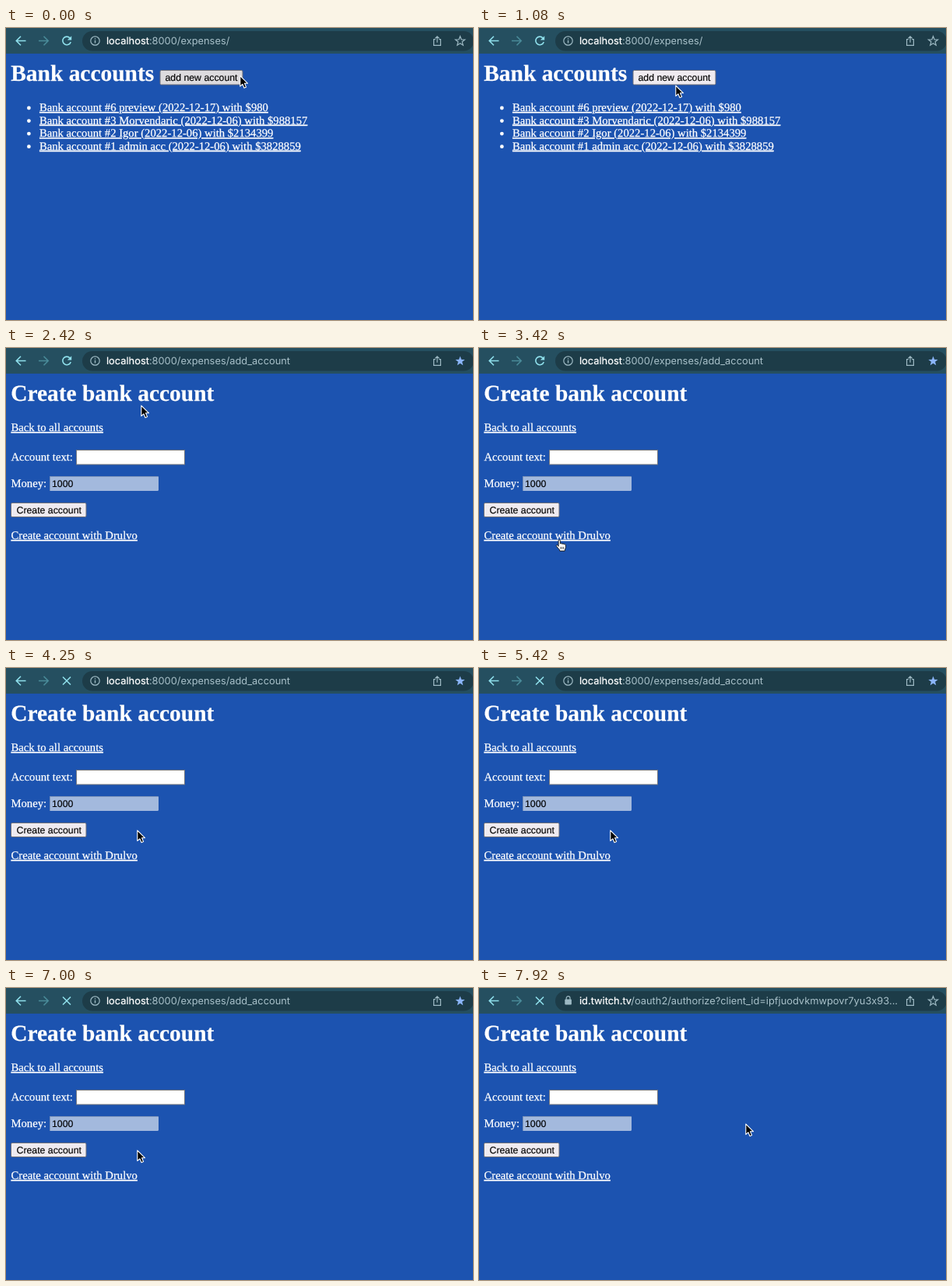
Write an HTML page that moves like this. It is 600 px wide and 376 px high and loops after 8000 ms.

```html
<!DOCTYPE html>
<html lang="en">
<head>
<meta charset="utf-8">
<title>Bank accounts</title>
<style>
  html, body { margin: 0; width: 100%; height: 100%; overflow: hidden; background: #1c53b0; }
  svg { display: block; width: 600px; height: 376px; text-rendering: geometricPrecision; }
  .serif { font: 14.67px "Liberation Serif", "Times New Roman", serif; fill: #fff; stroke: #fff; stroke-width: .25; }
  .title { font-size: 29.44px; font-weight: bold; }
  .link { text-decoration: underline; }
  .sans { font: 12.3px "Liberation Sans", Arial, sans-serif; fill: #000; stroke: #000; stroke-width: .15; }
  .url { font: 12.85px Inter, sans-serif; fill: #a9c1ca; }
  .host { fill: #fff; stroke: #fff; stroke-width: .2; }
  .button { fill: #efebf0; stroke: #6c6e78; }
  .hover { fill: #dddbde; }
  .stroke { fill: none; stroke-width: 1.6; }
  .bright { stroke: #8fe0ec; }
  .dim { stroke: #4a8b99; }
  .soft { stroke: #9db9c3; stroke-width: 1.2; }
</style>
</head>
<body>
<svg viewBox="0 0 600 376">
  <rect width="600" height="376" fill="#1c53b0"/>
  <rect width="600" height="33" fill="#254f60"/>
  <rect x="98" y="4" width="503" height="25.5" rx="12.75" fill="#1d3c48"/>
  <path class="stroke bright" d="M25.5 16.5H13.5M19 10.8L13.3 16.5L19 22.2"/>
  <path class="stroke dim" d="M42 16.5H54M48.5 10.8L54.2 16.5L48.5 22.2"/>
  <g id="reload">
    <path class="stroke bright" d="M82.2 13A5.3 5.3 0 1 0 83.2 18"/>
    <path fill="#8fe0ec" d="M84.2 10.2V15.6H78.8Z"/>
  </g>
  <path id="stop" class="stroke bright" d="M73 11.5L83 21.5M83 11.5L73 21.5"/>
  <g id="info" class="stroke soft">
    <circle cx="114.5" cy="16.5" r="5.7"/>
    <path d="M114.5 15.8V19.6M114.5 13.2V14.6" stroke-width="1.4"/>
  </g>
  <g id="lock">
    <rect x="110.3" y="14.6" width="8.6" height="7" rx="1" fill="#9db9c3"/>
    <path class="stroke soft" d="M112.2 15V13A2.4 2.4 0 0 1 117 13V15"/>
  </g>
  <text class="url" x="129" y="21.3"><tspan id="host" class="host"></tspan><tspan id="path"></tspan></text>
  <path class="stroke soft" d="M551.8 14.7H549.6V22.4H558.4V14.7H556.2M554 18.8V11M551.4 13.4L554 10.8L556.6 13.4"/>
  <path id="star"/>

  <g id="list">
    <text class="serif title" x="6.2" y="68">Bank accounts</text>
    <rect id="add" class="button" x="198" y="54.5" width="106" height="18.5" rx="1.5"/>
    <text class="sans" x="204.5" y="68">add new account</text>
  </g>

  <g id="form">
    <text class="serif title" x="6.2" y="68">Create bank account</text>
    <text class="serif link" x="6.5" y="107">Back to all accounts</text>
    <text class="serif" x="6.5" y="145">Account text:</text>
    <rect x="90.5" y="131.5" width="139" height="18.5" fill="#fff" stroke="#77797f"/>
    <text class="serif" x="6.5" y="179">Money:</text>
    <rect x="56" y="165" width="140" height="19" rx="1.5" fill="#a3b9dd"/>
    <path d="M56.5 184V165.5H195.5" fill="none" stroke="#7890b8"/>
    <text class="sans" x="59" y="179">1000</text>
    <rect class="button" x="6.5" y="199.5" width="96.5" height="18" rx="1.5"/>
    <text class="sans" x="13.5" y="213">Create account</text>
    <text class="serif link" x="6.5" y="246">Create account with Drulvo</text>
  </g>

  <g id="cursor" stroke="#fff" stroke-linejoin="round">
    <path id="arrow" stroke-width="1.1" d="M-.2 .2V13.6L2.9 10.8L5 15.7L7.6 14.6L5.5 9.8H9.6Z"/>
    <g id="hand" fill="#fff" stroke="#111" stroke-width=".9">
      <path d="M-.9 8.4V1.1C-.9-.5 1.4-.5 1.4 1.1V5.2C1.7 4 3.6 4.2 3.7 5.5C4.3 4.5 6 4.8 6 6C6.8 5.2 8.3 5.7 8.3 7V9.6C8.3 11.2 7.2 12 7.2 14.3H.8C.8 12.2-1.7 10.8-3.4 8.3C-4.2 6.9-2.6 6-1.7 7.2Z"/>
      <path fill="none" stroke-width=".7" d="M1.8 9V12M3.7 9V12M5.6 9V12"/>
    </g>
  </g>
</svg>
<script>
const LOOP = 8000, STEP = LOOP / 96;
const PAGE_CHANGE = 1910, LOAD_START = 3580, REDIRECT = 7330;
const $ = id => document.getElementById(id);
const show = (id, on) => { $(id).style.display = on ? "" : "none"; };

const accounts = [
  "#6 preview (2022-12-17) with $980",
  "#3 Morvendaric (2022-12-06) with $988157",
  "#2 Igor (2022-12-06) with $2134399",
  "#1 admin acc (2022-12-06) with $3828859"
];
$("list").innerHTML += accounts.map((label, i) => {
  const y = 107 + i * 16.56;
  return `<circle cx="29.4" cy="${y - 4}" r="2.4" fill="#fff"/>
    <text class="serif link" x="43" y="${y}">Bank account ${label}</text>`;
}).join("");

const starPoints = Array.from({ length: 10 }, (_, i) => {
  const r = i % 2 ? 2.7 : 6.4, a = i * Math.PI / 5;
  return `${(583.5 + r * Math.sin(a)).toFixed(2)} ${(17 - r * Math.cos(a)).toFixed(2)}`;
});
$("star").setAttribute("d", `M${starPoints.join("L")}Z`);

// Pointer path: time, x, y
const moves = [
  [0, 301, 61.5], [170, 301, 61.5], [830, 253, 74], [1170, 253, 74],
  [1500, 246, 65], [1920, 246, 65], [2400, 174, 74], [2500, 174, 74],
  [3170, 103, 247], [3670, 103, 247], [3850, 122, 259], [4170, 169, 209],
  [7500, 169, 209], [7910, 343, 175], [LOOP, 343, 175]
];

function pointerAt(t) {
  const i = Math.max(1, moves.findIndex(m => m[0] > t));
  const [t0, x0, y0] = moves[i - 1], [t1, x1, y1] = moves[i];
  const k = (t - t0) / (t1 - t0), e = k * k * (3 - 2 * k);
  return [x0 + (x1 - x0) * e, y0 + (y1 - y0) * e];
}

const inside = ([x, y], left, top, right, bottom) =>
  x >= left && x <= right && y >= top && y <= bottom;

function draw(time) {
  const t = Math.floor((time % LOOP + 1) / STEP) * STEP % LOOP;
  const onList = t < PAGE_CHANGE, redirected = t >= REDIRECT, loading = t >= LOAD_START;
  const pointer = pointerAt(t);

  show("list", onList);
  show("form", !onList);
  show("reload", !loading);
  show("stop", loading);
  show("info", !redirected);
  show("lock", redirected);
  $("host").textContent = redirected ? "id.twitch.tv" : "localhost";
  $("path").textContent = redirected
    ? "/oauth2/authorize?client_id=ipfjuodvkmwpovr7yu3x93..."
    : ":8000/expenses/" + (onList ? "" : "add_account");

  const starred = !onList && !redirected;
  $("star").setAttribute("class", starred ? "" : "stroke soft");
  $("star").setAttribute("fill", "#8ab4f8");

  $("add").classList.toggle("hover", inside(pointer, 198, 54, 304, 73));
  const onLink = !onList && inside(pointer, 6, 234, 168, 250);
  show("hand", onLink);
  show("arrow", !onLink);
  $("cursor").setAttribute("transform", `translate(${pointer})`);
}

const start = performance.now();
function tick(now) {
  draw(Math.max(0, now - start));
  requestAnimationFrame(tick);
}
draw(0);
requestAnimationFrame(tick);
</script>
</body>
</html>
```
